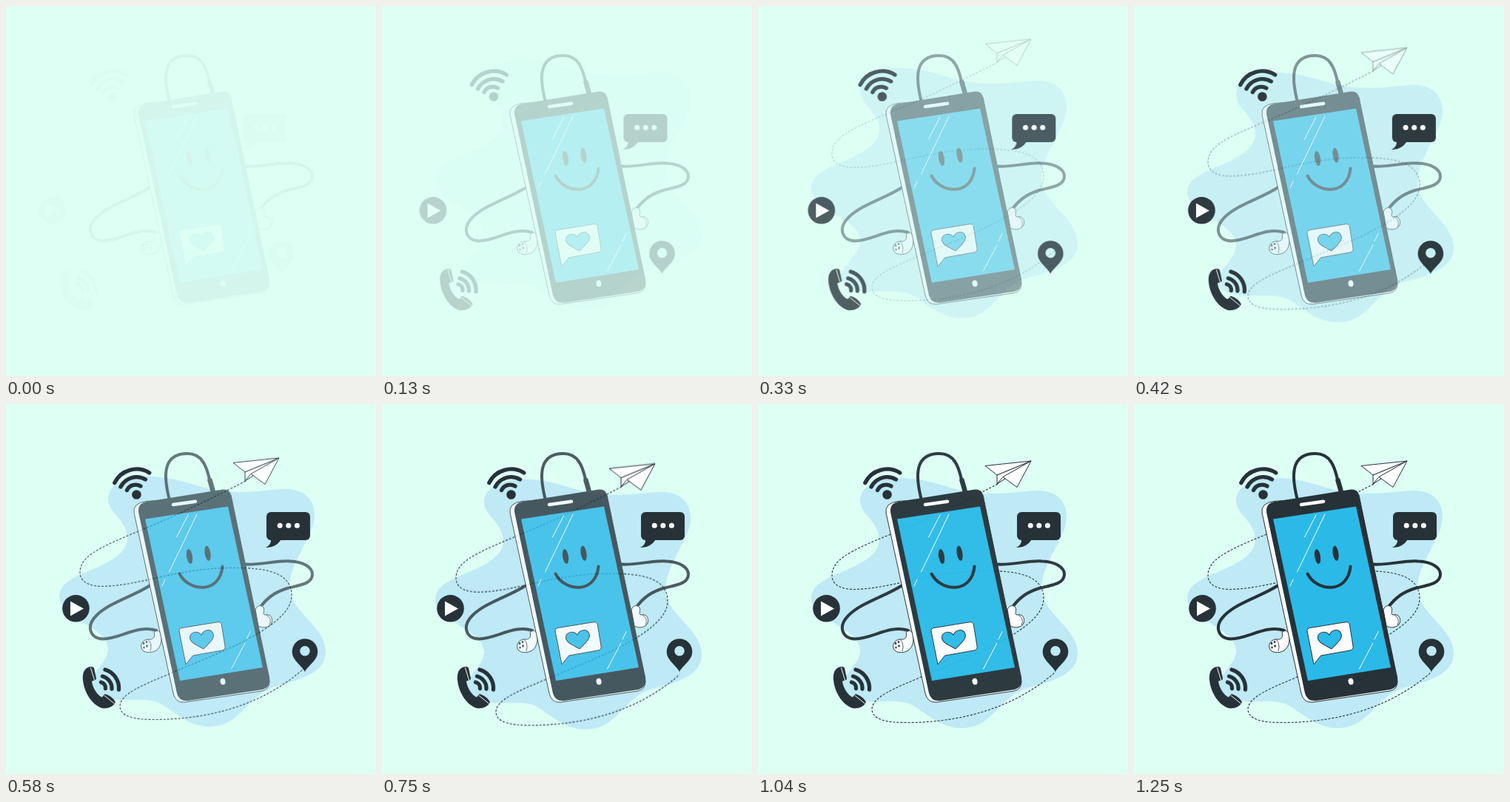
An HTML page that plays this animation: 500 by 500 pixels, repeating every 1330 ms.

```html
<!DOCTYPE html>
<html lang="en">
<head>
<meta charset="utf-8">
<title>Happy phone</title>
<style>
  html, body { margin: 0; width: 100%; height: 100%; overflow: hidden; background: #ddfff4; }
  svg { display: block; width: 100vw; height: 100vh; }

  .drop, .slide, .fade { animation: 1330ms infinite both; }
  .drop { animation-name: drop; }
  .slide { animation-name: slide; }
  .fade { animation-name: fade; }

  /* the first two overshoot, then rest until the loop restarts */
  @keyframes drop {
    0% { transform: translateY(-29.9px); opacity: .0035; animation-timing-function: cubic-bezier(.347, .077, .499, 1.369); }
    72.6%, 100% { transform: none; opacity: 1; }
  }
  @keyframes slide {
    0% { transform: translateX(-29.6px); opacity: .0126; animation-timing-function: cubic-bezier(.336, .14, .498, 1.362); }
    51.35%, 100% { transform: none; opacity: 1; }
  }
  @keyframes fade {
    0% { opacity: .045; animation-timing-function: cubic-bezier(.122, .204, .624, 1); }
    95.1%, 100% { opacity: 1; }
  }

  .ink { fill: #263238; }
  .white { fill: #fff; }
  .blue { fill: #2bbae8; }
  .line { fill: none; stroke: #263238; stroke-linecap: round; stroke-linejoin: round; }
  .edge { stroke: #263238; stroke-width: 1; stroke-linejoin: round; }
  .shine { fill: none; stroke: #fff; stroke-width: 1; stroke-linecap: round; }
  .trail { stroke-width: 1.1; stroke-linecap: butt; stroke-dasharray: 3 2; }
</style>
</head>
<body>
<svg viewBox="0 0 500 500">
  <!-- backdrop, flight path and paper plane -->
  <g class="drop">
    <path fill="#bee9f5" d="M138 130C138 110 165 100 192 100C240 100 262 121 315 121C345 121 360 117 380 117
      C405 118 417 133 417 153C417 180 383 215 383 250C383 282 432 302 432 337C432 364 400 374 370 382
      C325 392 320 438 275 438C245 438 225 415 205 405C185 399 160 404 140 401C120 397 110 390 113 378
      C117 365 139 350 138 332C136 302 72 292 72 262C72 238 110 231 135 217C152 208 164 198 164 183
      C164 168 153 158 148 151C142 145 138 138 138 130Z"/>
    <g class="drop">
      <path class="line trail" d="M324 108C270 136 225 157 178 176.500C120 200 100 212 100 231.500
        C100 246 115 250.500 131 250.500C185 249 230 226 305 225.500C350 225 386 231 386 263
        C386 307 275 345 219 369.500C185 384 154 396 154 412.500C154 427 175 430.500 200 430.500
        C280 430.500 350 408 402 362"/>
      <g class="white edge">
        <path d="M323 96V108L369 77Z"/>
        <path d="M307 83.5L369 77L323 96Z"/>
        <path d="M369 77L331 98.5L350 112.5Z"/>
        <path d="M323 108L331 98.5L334 101Z"/>
      </g>
    </g>
  </g>

  <!-- icons -->
  <g class="slide">
    <circle class="ink" cx="174.5" cy="122.5" r="6.3"/>
    <g class="line" stroke-width="5.3">
      <path d="M144.8 106.5A33 33 0 0 1 191.8 93"/>
      <path d="M153 112A24 24 0 0 1 186.5 102"/>
      <path d="M161.5 116.5A13 13 0 0 1 180 111"/>
    </g>

    <rect class="ink" x="350" y="146" width="59" height="38" rx="6"/>
    <path class="ink" d="M356 183Q357 190 349 194Q362 195 370 183Z"/>
    <g class="white">
      <circle cx="368.2" cy="164.2" r="3.5"/>
      <circle cx="379.8" cy="164.2" r="3.5"/>
      <circle cx="391.4" cy="164.2" r="3.5"/>
    </g>

    <circle class="ink" cx="92.5" cy="276.3" r="18.3"/>
    <path class="white" d="M85 266.5L103 276.5L85 286.5Z"/>

    <path class="ink" fill-rule="evenodd" d="M402 362C398 353 384.7 347 384.7 334.5a17.3 17.3 0 0 1 34.6 0
      C419.3 347 406 353 402 362ZM395.2 333.7a6.8 6.8 0 0 0 13.6 0a6.8 6.8 0 0 0 -13.6 0Z"/>

    <path class="ink" d="M112 355C104 356 101 364 102 373C104 393 117 408 128 411C136 412 143 409 146 403
      C144 398 137 393 132 392C129 393 130 396 127 396C120 392 115 382 114 375C115 373 120 374 120 371
      L117 357C116 355 114 355 112 355Z"/>
    <path class="shine" d="M112.5 356.5L117.5 373M131 394L144 404.5"/>
    <g class="line" stroke-width="5.3">
      <path d="M132 359A26 26 0 0 1 150.5 386"/>
      <path d="M128.5 368A16.5 16.5 0 0 1 141 385"/>
      <path d="M126.5 376A8 8 0 0 1 132.5 384.5"/>
    </g>
  </g>

  <!-- phone with earphones -->
  <g class="fade">
    <g class="line" stroke-width="4">
      <path d="M220.5 128C213 98 211 67 245 67C265 67 271 84 275 102"/>
      <path d="M322 216.5C345 218 365 211 384 212.500C402 213 414 221 414 230C414 243 397 245 380 249
        C364 254 354 261 344 274"/>
      <path d="M195 245C172 260 140 268 122 286C108 300 113 317 131 317.5C155 317 178 298 203 306"/>
      <path stroke-width="6.5" d="M275.5 103L279.5 117"/>
    </g>
    <g class="white edge">
      <path d="M200 309C203 305 209 306 209 311C211 318 210 328 203 333C197 337 185 337 183 330
        C181 322 188 317 195 318C199 318 202 314 200 309Z"/>
      <path d="M337 278C339 272 345 271 348 275C350 280 346 284 350 285C358 283 361 290 359 296
        C356 303 346 303 341 300Z"/>
      <path fill="none" stroke-width=".8" d="M352 285Q360 290 356 299M192 318Q198 324 195 334"/>
    </g>
    <g class="ink">
      <ellipse cx="186" cy="323.5" rx="1.3" ry="1.8"/>
      <ellipse cx="190" cy="321.5" rx="1.3" ry="1.6"/>
      <ellipse cx="186.5" cy="329" rx="1.2" ry="1.6"/>
      <ellipse cx="190.5" cy="327" rx="1.3" ry="1.7"/>
    </g>

    <path class="white edge" d="M189 131.5Q171 134 173 147L226 391Q229 404 241 403L345 388Q356 386 356 375L304 123Z"/>
    <path class="ink" d="M190 132L293 115.5Q302 114.5 304 123L356 369Q358 383 346 386L246 401Q234 402 231 391
      L179 146Q178 134 190 132Z"/>
    <path class="blue" d="M188 155.5L300 138.5L347 356L235 374Z"/>
    <path class="shine" style="stroke-width:4.5" d="M226 136L256 131.8"/>
    <ellipse class="white" cx="293" cy="375" rx="3.5" ry="4.4" transform="rotate(-10 293 375)"/>

    <path class="shine" d="M246 150L230.5 180M258 149L220.5 227M215 237L211 246M330 307.5L325 318M323 323L304.5 358"/>
    <ellipse class="ink" cx="248" cy="206" rx="3.9" ry="10.2" transform="rotate(-9 248 206)"/>
    <ellipse class="ink" cx="272.5" cy="201.7" rx="3.9" ry="10.2" transform="rotate(-9 272.5 201.7)"/>
    <path class="line" stroke-width="4" d="M234.5 229.5C247 254 289 257 292.5 219.5"/>

    <path class="white edge" d="M238 302.5L286 294.7Q290.5 294 291.3 298L296 327Q297 332 292 333L252.5 340L243 352
      L234 307Q233.5 303.3 238 302.5Z"/>
    <path class="blue edge" transform="translate(265 318) rotate(-9)" d="M0 13C-8 7 -17 2 -16 -5C-14 -13 -4 -13 0 -6
      C4 -13 14 -13 16 -5C17 2 8 7 0 13Z"/>
  </g>
</svg>
</body>
</html>
```
